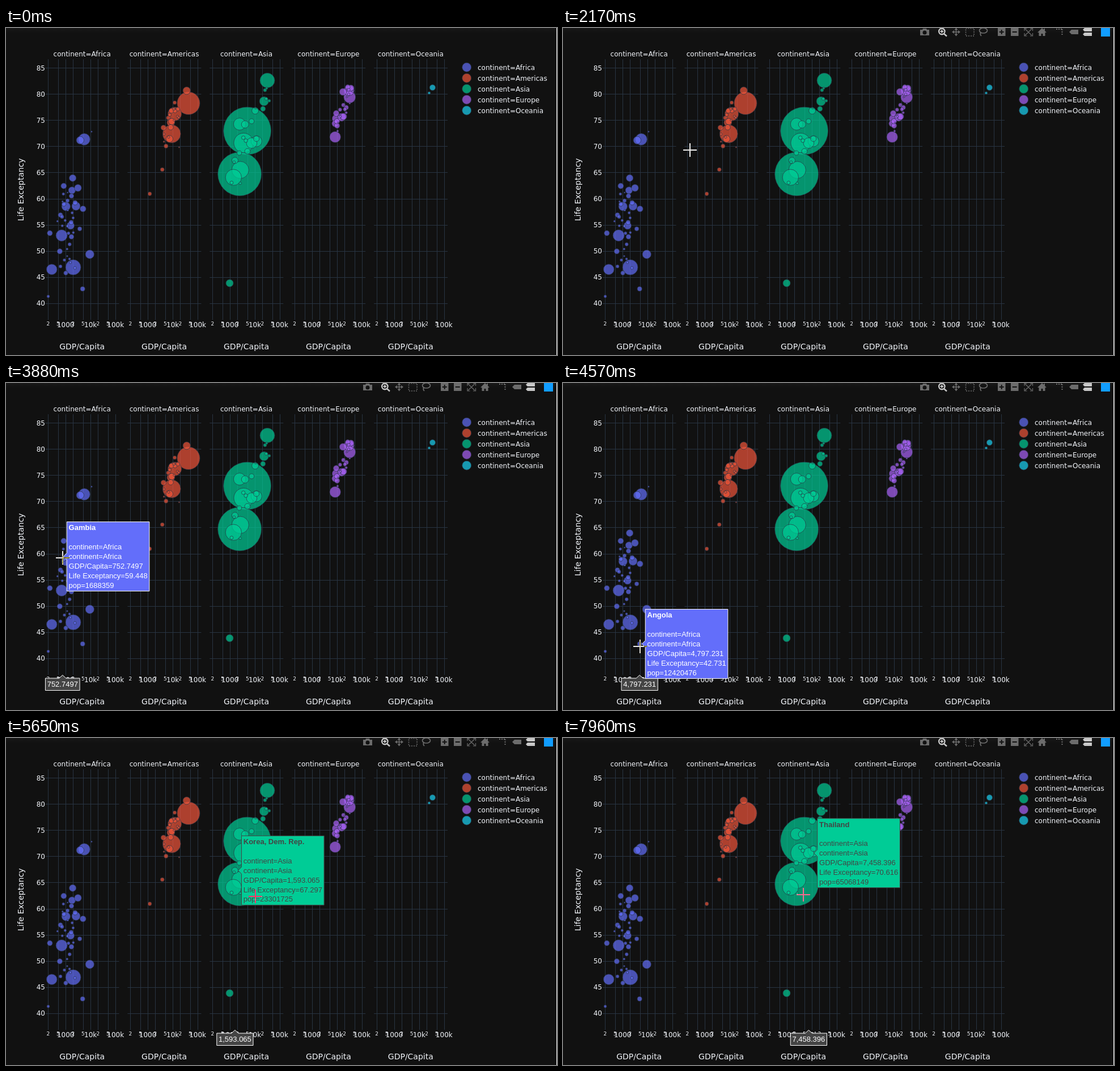
Write an HTML page with a canvas that moves like this. It is 972x576 px and loops after 8000 ms.

```html
<!DOCTYPE html>
<html lang="en">
<head>
<meta charset="utf-8">
<title>Life expectancy by continent</title>
<style>
  html, body { margin: 0; width: 100%; height: 100%; overflow: hidden; background: #111; }
  canvas { display: block; }
</style>
</head>
<body>
<canvas id="stage" width="972" height="576"></canvas>
<script>
const W = 972, H = 576, LOOP = 8000, STEP = 77;
const SANS = '"DejaVu Sans", sans-serif', HOVER = '"Liberation Sans", Arial, sans-serif';
const GRID = '#283442', INK = '#f2f5fa';
const stage = document.getElementById('stage').getContext('2d');

// Large or hovered countries: GDP per capita, life expectancy, population.
// The cloud fills in the small ones along a trend from one [log GDP, life] to another.
const panels = [
  {
    name: 'Africa', color: '#636efa', ink: '#fff',
    cloud: { count: 38, from: [2.8, 49], to: [3.35, 57], spread: [.22, 5], pop: 9e6 },
    countries: {
      'Nigeria': [2014, 46.86, 135e6],
      'Egypt': [5581, 71.34, 80e6],
      'Ethiopia': [691, 52.95, 76e6],
      'Congo, Dem. Rep.': [278, 46.46, 65e6],
      'South Africa': [9270, 49.34, 44e6],
      'Sudan': [2602, 58.56, 42e6],
      'Morocco': [3820, 71.16, 34e6],
      'Niger': [619.6769, 56.867, 12894865],
      'Angola': [4797.231, 42.731, 12420476],
      'Gambia': [752.7497, 59.448, 1688359],
      'Mauritius': [10956.99, 72.801, 1250882]
    }
  },
  {
    name: 'Americas', color: '#ef553b', ink: '#444',
    cloud: { count: 20, from: [3.6, 71], to: [4.15, 78], spread: [.1, 1.3], pop: 9e6 },
    countries: {
      'United States': [42951.65, 78.242, 301139947],
      'Brazil': [9066, 72.39, 190e6],
      'Mexico': [11978, 76.19, 109e6],
      'Canada': [36319, 80.65, 33e6],
      'Peru': [7408.906, 71.421, 28674757],
      'Bolivia': [3822, 65.55, 9e6],
      'Haiti': [1202, 60.92, 8.5e6],
      'Trinidad and Tobago': [18008.51, 69.819, 1056608]
    }
  },
  {
    name: 'Asia', color: '#00cc96', ink: '#444',
    cloud: { count: 16, from: [3.1, 64], to: [4.55, 78], spread: [.12, 2], pop: 14e6 },
    countries: {
      'China': [4959.115, 72.961, 1318683096],
      'India': [2452, 64.7, 1110e6],
      'Indonesia': [3541, 70.65, 223e6],
      'Pakistan': [2606, 65.48, 169e6],
      'Bangladesh': [1391, 64.06, 150e6],
      'Japan': [31656, 82.6, 127e6],
      'Vietnam': [2442, 74.25, 85e6],
      'Iran': [11605.71, 70.964, 69453570],
      'Thailand': [7458.396, 70.616, 65068149],
      'Korea, Rep.': [23348.14, 78.623, 49044790],
      'Afghanistan': [975, 43.83, 32e6],
      'Korea, Dem. Rep.': [1593.065, 67.297, 23301725],
      'Israel': [25523.28, 80.745, 6426679]
    }
  },
  {
    name: 'Europe', color: '#ab63fa', ink: '#fff',
    cloud: { count: 25, from: [3.95, 74], to: [4.6, 81], spread: [.06, .8], pop: 8e6 },
    countries: {
      'Germany': [32170, 79.41, 82e6],
      'Turkey': [8458, 71.78, 71e6],
      'France': [30470, 80.66, 61e6],
      'Poland': [15390, 75.56, 38e6]
    }
  },
  {
    name: 'Oceania', color: '#19d3f3', ink: '#444',
    countries: {
      'Australia': [34435, 81.24, 20e6],
      'New Zealand': [25185, 80.2, 4e6]
    }
  }
];

// Pointer stops: leave, arrive, x, y, country hovered on arrival
const tour = [
  [430, 430, 143, 300],
  [510, 1070, 290, 192, 'Peru'],
  [1220, 1300, 310, 133, 'Trinidad and Tobago'],
  [1380, 1380, 322, 128, 'United States'],
  [1850, 2310, 185, 250],
  [2460, 2620, 150, 195, 'Mauritius'],
  [3090, 3090, 148, 215, 'Mauritius'],
  [3170, 3480, 97, 328, 'Niger'],
  [3730, 3880, 100, 308, 'Gambia'],
  [4110, 4570, 136, 464, 'Angola'],
  [4880, 5420, 440, 200, 'Iran'],
  [5500, 5650, 440, 279, 'Korea, Dem. Rep.'],
  [5720, 5960, 440, 190, 'China'],
  [6030, 6260, 456, 131, 'Korea, Rep.'],
  [6410, 6410, 457, 137, 'Israel'],
  [6490, 6710, 428, 182, 'China'],
  [6790, 7100, 434, 274, 'Thailand'],
  [7960, 7960, 424, 276, 'Thailand']
];

const panelX = i => 144.9 * i;
const gdpX = (i, gdp) => panelX(i) + 149.2 + 44 * Math.log10(gdp / 1e4);
const lifeY = life => 484.7 - (life - 40) * 9.21;
const radius = pop => 42 * Math.sqrt(pop / 1318683096);
const mix = (a, b, u) => a + (b - a) * u;

let seed = 7;
const random = () => (seed = seed * 16807 % 2147483647) / 2147483647;
const bell = () => 2 * (random() + random() + random() - 1.5);

function scatter({ count, from, to, spread, pop }) {
  return Array.from({ length: count }, () => {
    const u = random();
    const [logGdp, life] = from.map((a, k) => mix(a, to[k], u) + bell() * spread[k]);
    return [10 ** logGdp, life, pop * Math.exp(bell() * .8 - .3)];
  });
}

function text(c, str, x, y, font, color, align = 'left') {
  c.font = font;
  c.fillStyle = color;
  c.textAlign = align;
  c.fillText(str, x, y);
}

function line(c, x1, y1, x2, y2) {
  c.strokeStyle = GRID;
  c.beginPath();
  c.moveTo(x1, y1);
  c.lineTo(x2, y2);
  c.stroke();
}

function bubble(c, x, y, r, color) {
  c.globalAlpha = .7;
  c.fillStyle = color;
  c.strokeStyle = GRID;
  c.beginPath();
  c.arc(x, y, r, 0, 7);
  c.fill();
  c.stroke();
  c.globalAlpha = 1;
}

function layer(paint) {
  const canvas = document.createElement('canvas');
  canvas.width = W;
  canvas.height = H;
  paint(canvas.getContext('2d'));
  return canvas;
}

const chart = layer(c => {
  const shade = c.createLinearGradient(0, 0, 0, 9);
  shade.addColorStop(0, '#181818');
  shade.addColorStop(1, '#111');
  c.fillStyle = shade;
  c.fillRect(0, 0, W, H);
  c.fillStyle = '#fff';
  c.fillRect(W - 1, 0, 1, H);

  panels.forEach(({ name, color, countries, cloud }, i) => {
    const left = panelX(i) + 69.5, mid = left + 64.7;
    for (const gdp of [200, 500, 1e3, 2e3, 5e3, 1e4, 2e4, 5e4, 1e5]) {
      const x = gdpX(i, gdp), gx = Math.round(x) + .5, lead = String(gdp)[0];
      line(c, gx, 55, gx, 514);
      if (lead > 1) text(c, lead, x, 524, '9px ' + SANS, INK, 'center');
      else text(c, gdp < 1e4 ? gdp : gdp / 1e3 + 'k', x, 527, '12px ' + SANS, INK, 'center');
    }
    for (let life = 40; life <= 85; life += 5) {
      const y = lifeY(life), gy = Math.round(y) + .5;
      line(c, left, gy, left + 130, gy);
      if (!i) text(c, life, 69, y + 4.5, '12px ' + SANS, INK, 'right');
    }
    text(c, 'continent=' + name, mid, 49.5, '12px ' + SANS, INK, 'center');
    text(c, 'GDP/Capita', mid, 566, '14px ' + SANS, INK, 'center');

    const all = [...Object.values(countries), ...(cloud ? scatter(cloud) : [])];
    all.sort((a, b) => b[2] - a[2]);
    for (const [gdp, life, pop] of all) bubble(c, gdpX(i, gdp), lifeY(life), radius(pop), color);

    bubble(c, 812.7, 69.2 + 19 * i, 8, color);
    text(c, 'continent=' + name, 832, 73.5 + 19 * i, '12px ' + SANS, INK);
  });

  c.translate(31, 284.7);
  c.rotate(-Math.PI / 2);
  text(c, 'Life Exceptancy', 0, 0, '14px ' + SANS, INK, 'center');
});

const toolbar = layer(c => {
  const dim = '#6c6c6c', lit = '#c8c8c8';
  const fill = (d, color = dim) => {
    c.fillStyle = color;
    c.fill(new Path2D(d), 'evenodd');
  };
  const stroke = (d, width, color = dim, dash = []) => {
    c.strokeStyle = color;
    c.lineWidth = width;
    c.setLineDash(dash);
    c.stroke(new Path2D(d));
  };
  fill('M630 3h4l1-2h6l1 2h4v10h-16zM641.5 8a3.5 3.5 0 1 0-7 0a3.5 3.5 0 1 0 7 0z');
  stroke('M673.5 6a5.2 5.2 0 1 0-10.4 0a5.2 5.2 0 1 0 10.4 0M672 10l5 4.5', 2.4, lit);
  stroke('M665.5 6h5.5M668.3 3.3v5.5', 2, lit);
  stroke('M688 7h11M693.5 1v12', 1.5);
  fill('M686 7l4-3v6zM701 7l-4-3v6zM693.5-.5l-3 4h6zM693.5 14.5l-3-4h6z');
  stroke('M710.5.5h14.5v13.5h-14.5z', 1.6, dim, [2, 2]);
  stroke('M748.5 4.5a7 4.5 0 1 0-14 0a7 4.5 0 1 0 14 0M737 8q-2 3 1 6', 1.7);
  fill('M767 0h13.5v14h-13.5zM772.7 3v3h-3v2h3v3h2v-3h3v-2h-3v-3z');
  fill('M790 0h13.5v14h-13.5zM792.7 6v2h8v-2z');
  stroke('M814 5v-4.5h4.5M824 .5h4.5v4.5M828.5 9v5h-4.5M818.5 14h-4.5v-5M815 1.5l12 11.5M827 1.5l-12 11.5', 1.2);
  fill('M837 8l8-8l3 3v-2h2v4l3 3h-2.5v6h-4v-4h-3v4h-4v-6z');
  stroke('M870 2h12M880.5 2v12', 2, dim, [2, 2]);
  fill('M893 7l4-4h12v8h-12z');
  fill('M917 3l3-3h13v6h-13zM917 11l3-3h13v6h-13z', lit);
  fill('M949 0h16v15h-16z', '#119dff');
});

function formatGdp(gdp) {
  if (gdp >= 1e4) return (gdp / 1e3).toFixed(5) + 'k';
  return gdp < 1e3 ? gdp.toFixed(4) : gdp.toFixed(3).replace(/^\d/, '$&,');
}

function shape(points, fill, stroke) {
  stage.beginPath();
  points.forEach(([x, y]) => stage.lineTo(x, y));
  stage.closePath();
  stage.fillStyle = fill;
  stage.strokeStyle = stroke;
  stage.fill();
  stage.stroke();
}

function drawHover(name) {
  const i = panels.findIndex(p => name in p.countries);
  const { name: continent, color, ink, countries } = panels[i], [gdp, life, pop] = countries[name];
  const x = gdpX(i, gdp), y = lifeY(life), tip = x + radius(pop), left = tip + 6;
  const value = formatGdp(gdp), group = 'continent=' + continent;
  const rows = [name, '', group, group, 'GDP/Capita=' + value, 'Life Exceptancy=' + life, 'pop=' + pop];
  const font = k => (k ? '' : 'bold ') + '13px ' + HOVER;
  const width = (str, k) => (stage.font = font(k), stage.measureText(str).width);
  const right = left + Math.max(...rows.map(width)) + 6.5, top = y - 61, bottom = y + 61;
  const half = width(value, 1) / 2 + 3.2;

  shape([[x, 514.5], [x + 6, 520], [x + half, 520], [x + half, 541.5],
    [x - half, 541.5], [x - half, 520], [x - 6, 520]], '#444', '#fff');
  text(stage, value, x, 535.3, font(1), '#fff', 'center');

  shape([[tip, y], [left, y - 6], [left, top], [right, top],
    [right, bottom], [left, bottom], [left, y + 6]], color, ink);
  rows.forEach((row, k) => text(stage, row, left + 3.3, top + 14.8 + 16.9 * k, font(k), ink));
}

function drawPointer(x, y) {
  stage.globalCompositeOperation = 'difference';
  stage.fillStyle = '#fff';
  stage.fillRect(x - 12, y - 1, 24, 2);
  stage.fillRect(x - 1, y - 12, 2, 11);
  stage.fillRect(x - 1, y + 1, 2, 11);
  stage.globalCompositeOperation = 'source-over';
}

function draw() {
  const t = performance.now() % LOOP;
  stage.drawImage(chart, 0, 0);
  stage.globalAlpha = Math.min(1, Math.max(0, (t - 400) / 300));
  stage.drawImage(toolbar, 0, 0);
  stage.globalAlpha = 1;

  const stop = tour.findLastIndex(([leave]) => leave <= t);
  if (stop >= 0) {
    const [leave, arrive, x, y, name] = tour[stop];
    const [, , fromX, fromY] = tour[Math.max(0, stop - 1)];
    const steps = Math.round((arrive - leave) / STEP) + 1;
    const u = t >= arrive ? 1 : Math.ceil((t - leave + 1) / STEP) / steps;
    if (name && u >= 1) drawHover(name);
    drawPointer(Math.round(mix(fromX, x, u)), Math.round(mix(fromY, y, u)));
  }
  requestAnimationFrame(draw);
}
draw();
</script>
</body>
</html>
```
